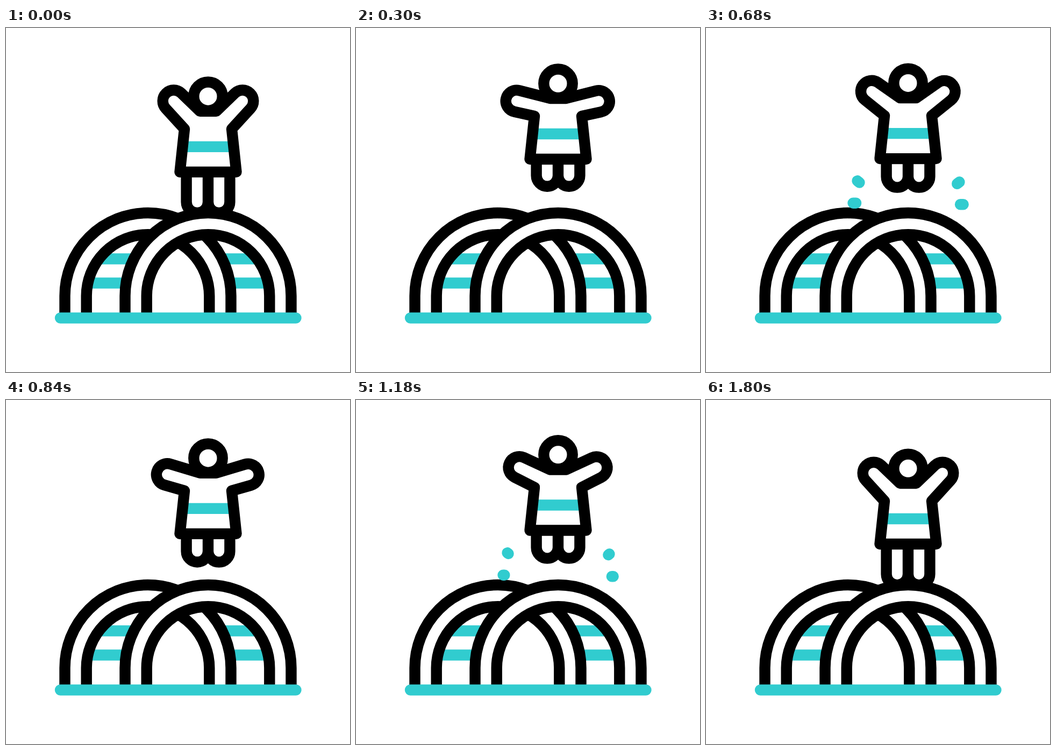
These frames come from a looping animation (640x640 px, 3600 ms). An HTML page:

```html
<!DOCTYPE html>
<html lang="en">
<head>
<meta charset="utf-8">
<title>Jumping on arches</title>
<style>
  html, body { margin: 0; width: 100%; height: 100%; overflow: hidden; background: #fff; }
  svg { display: block; width: 100%; height: 100%; }
  path, circle { fill: none; stroke: #000; stroke-width: 20.4; stroke-linejoin: round; }
  .teal { stroke: #31cccf; }
  .round { stroke-linecap: round; }
  .band { stroke: #fff; stroke-width: 40; }
</style>
</head>
<body>
<svg viewBox="0 0 640 640">
  <g id="body">
    <path class="teal" d="M329 221H423"/>
    <path id="shirt"/>
    <circle cx="376" cy="127.3" r="26.7"/>
  </g>
  <path id="legs"/>
  <path class="teal" d="M175 429.5H238M154 474.5H222M402 429.5H465M418 474.5H486"/>
  <g id="arches"></g>
  <path class="teal round" d="M101 539.5H539.5"/>
  <path id="splash" class="teal round"/>
</svg>
<script>
const LOOP = 3600, JUMP = 480, JUMPS = 3, HEIGHT = 25.7, R = 20.3;
const $ = id => document.getElementById(id);

// [time, amount]: 0 = arms raised, 1 = arms spread
const armKeys = [[0, 0], [300, 1], [540, 0], [600, -0.2], [785, 1], [840, 0.91],
  [1065, -0.2], [1180, 0.62], [1280, 1], [1460, 0.4], [1600, -0.32], [1800, 0]];
// [time within a jump, leg length]
const legKeys = [[0, 54], [60, 53.5], [220, 32], [290, 30.6], [360, 32.5], [480, 54]];
// x1, y1, x2, y2 of each drop's path
const drops = [[302, 301, 281.5, 284.3], [302, 326, 273.5, 325.7],
  [450, 303.5, 471.5, 286.5], [450, 328.3, 478.7, 328.3]];

const clamp = x => Math.min(1, Math.max(0, x));
const ease = x => (x = clamp(x), x * x * (3 - 2 * x));

// Smooth curve through keys, flat at turning points
function curve(keys, t) {
  const last = keys.length - 1;
  if (t >= keys[last][0]) return keys[last][1];
  const i = keys.findIndex(k => k[0] > t) - 1;
  const rise = n => (keys[n + 1][1] - keys[n][1]) / (keys[n + 1][0] - keys[n][0]);
  const slope = n => {
    if (n === 0 || n === last) return 0;
    const a = rise(n - 1), b = rise(n);
    return a * b > 0 ? 2 * a * b / (a + b) : 0;
  };
  const [t0, a] = keys[i], [t1, b] = keys[i + 1], h = t1 - t0;
  const u = (t - t0) / h, v = 1 - u;
  return a * v * v * (1 + 2 * u) + b * u * u * (1 + 2 * v)
    + h * u * v * (slope(i) * v - slope(i + 1) * u);
}

const onCircle = ([x, y], a) => [x + R * Math.cos(a), y + R * Math.sin(a)];

function tangent(tip, p, sign) {
  const dx = p[0] - tip[0], dy = p[1] - tip[1];
  return onCircle(tip, Math.atan2(dy, dx) + sign * Math.acos(R / Math.hypot(dx, dy)));
}

// Outline of one arm, from point a round the hand to point b
function arm(a, tip, b, shoulder) {
  const far = onCircle(tip, Math.atan2(tip[1] - shoulder[1], tip[0] - shoulder[0]));
  const arc = p => `A${R} ${R} 0 0 0 ${p}`;
  return `${a}L${tangent(tip, a, -1)}${arc(far)}${arc(tangent(tip, b, 1))}L${b}`;
}

function shirtPath(w) {
  const left = arm([361, 155], [312 - 13 * w, 136 + 24 * w], [332, 188], [346, 171]);
  const right = arm([420, 188], [440 + 11.5 * w, 136 + 24.5 * w], [391, 155], [406, 171]);
  return `M${left}L323.5 268H428.5L${right}Z`;
}

function legsPath(hip, foot) {
  const leg = x => `M${x} ${hip}V${foot}a20.2 20.2 0 0 0 40.4 0V${hip}`;
  return leg(335.6) + leg(376);
}

function splashPath(t) {
  const n = Math.floor(t / JUMP), p = t - n * JUMP;
  if (n < 1 || n > JUMPS || p > 250) return "";
  const head = ease(p / 138), tail = ease((p - 40) / 225);
  return drops.map(([x1, y1, x2, y2]) => {
    const at = k => [x1 + (x2 - x1) * k, y1 + (y2 - y1) * k];
    return `M${at(tail)}L${at(head)}`;
  }).join("");
}

function archPath(x, r) {
  return `M${x - r} 531V498.5A${r} ${r} 0 0 1 ${x + r} 498.5V531`;
}

function jumpHeight(q) {
  return HEIGHT * (q < 0.5 ? Math.sin(Math.PI * q) : 4 * q * (1 - q));
}

function draw(t) {
  const moving = t < JUMP * JUMPS, p = moving ? t % JUMP : 0;
  const lift = moving ? jumpHeight(p / JUMP) : 0;
  const rest = moving ? 1 - ease(t / 60) : ease((t - 1450) / 60);
  const hip = 268 - lift;
  $("body").setAttribute("transform", `translate(0 ${-lift})`);
  $("shirt").setAttribute("d", shirtPath(curve(armKeys, t)));
  $("legs").setAttribute("d", legsPath(hip, hip + curve(legKeys, p) + 2 * rest));
  $("splash").setAttribute("d", splashPath(t));
}

$("arches").innerHTML = [264, 376].map(x =>
  `<path class="band" d="${archPath(x, 134.4)}"/><path d="${archPath(x, 154.5) + archPath(x, 114.3)}"/>`
).join("");

const start = performance.now();
function tick(now) {
  draw(Math.max(0, now - start) % LOOP);
  requestAnimationFrame(tick);
}
draw(0);
requestAnimationFrame(tick);
</script>
</body>
</html>
```
